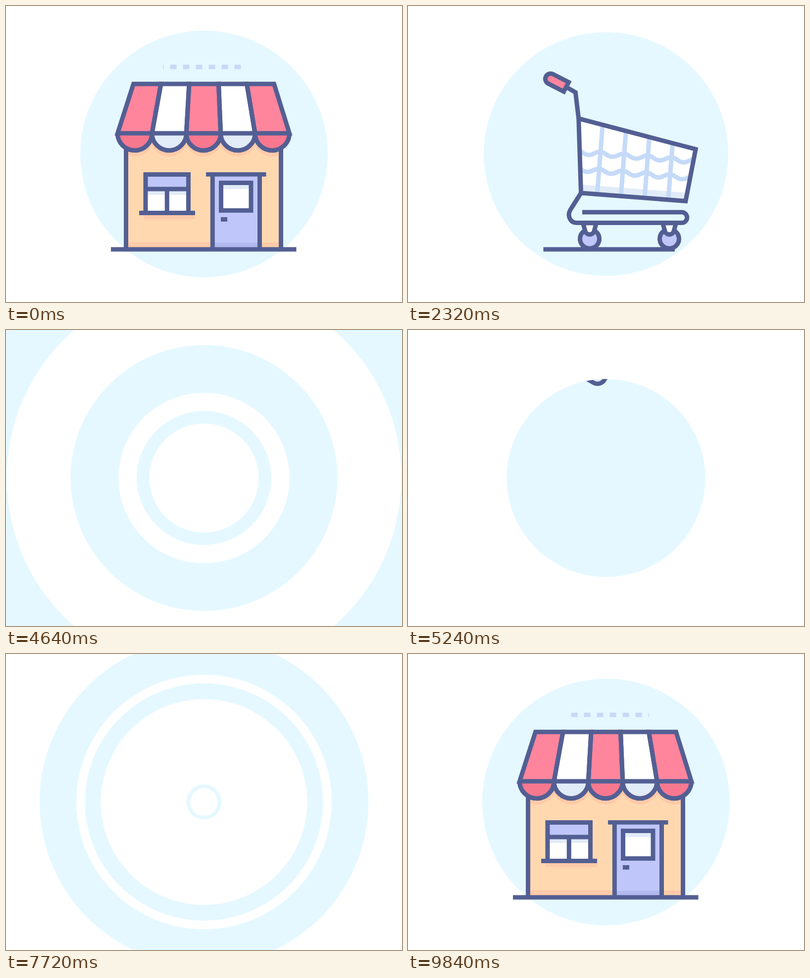
Animation, 800 px wide and 600 px high, one loop 9.88 s. Source, as an HTML page:

```html
<!DOCTYPE html>
<html lang="en">
<head>
<meta charset="utf-8">
<title>Shop, cart, card</title>
<style>
  html, body { margin: 0; width: 100%; height: 100%; overflow: hidden; background: #fff; }
  svg { display: block; width: 800px; height: 600px; }
  .line { stroke: #535f93; stroke-width: 9; fill: none; }
  .navy { fill: #535f93; }
  .sky { fill: #e5f8ff; }
  .white { fill: #fff; }
  .pink { fill: #ff859d; }
  .rose { fill: #f87890; }
  .peach { fill: #ffd8b0; }
  .tan { fill: #ffcaa8; }
  .lilac { fill: #bfc6f9; }
  .dusk { fill: #b1b9ee; }
  .pale { fill: #e2ecf8; }
  .mesh { stroke: #c5daf8; stroke-width: 9; fill: none; }
  .dash { stroke: #c8d9f8; stroke-width: 9; fill: none; }
</style>
</head>
<body>
<svg id="stage" viewBox="0 0 800 600"></svg>
<script>
const LOOP = 9880, SPAN = LOOP / 3, FIRST = 1000;

const rect = (x, y, x2, y2, cls) =>
  `<rect x="${x}" y="${y}" width="${x2 - x}" height="${y2 - y}" class="${cls}"/>`;
const path = (d, cls) => `<path d="${d}" class="${cls}"/>`;
const circle = (x, y, r, cls) => `<circle cx="${x}" cy="${y}" r="${r}" class="${cls}"/>`;
const range = n => [...Array(n).keys()];

function awning() {
  const top = [257.5, 313, 370, 429.5, 486.5, 541.5];
  const low = i => 225.5 + 69.4 * i;
  const arc = i => `M${low(i)} 258A34.7 34.7 0 0 0 ${low(i + 1)} 258`;
  const panel = i => `M${top[i]} 158H${top[i + 1]}L${low(i + 1)} 258H${low(i)}Z`;
  const five = range(5);
  return `<g clip-path="url(#wall)"><g transform="translate(0 8)">
      ${five.map(i => circle(low(i) + 34.7, 258, 39, 'tan')).join('')}</g></g>` +
    five.map(i => path(arc(i), 'line ' ) + path(arc(i) + 'Z', i % 2 ? 'pale' : 'rose')).join('') +
    five.map(i => path(arc(i), 'line')).join('') +
    five.map(i => path(panel(i), i % 2 ? 'white' : 'pink')).join('') +
    five.map(i => path(panel(i), 'line')).join('');
}

function shop() {
  return rect(247, 270, 551, 490, 'peach') +
    rect(247, 479, 551, 490, 'tan') +
    path('M242.5 270V490M555.5 270V490', 'line') +
    awning() +
    rect(278, 424, 382, 432, 'tan') +
    rect(282, 341, 369, 416, 'white') +
    rect(282, 341, 369, 371, 'lilac') +
    rect(282, 375, 369, 383, 'pale') +
    path('M282 341.5H368.5V419.5H282ZM282 371H368.5M325.3 371V419', 'line') +
    rect(269, 415, 382, 424, 'navy') +
    rect(417, 341, 513, 490, 'lilac') +
    rect(417, 480, 513, 490, 'dusk') +
    path('M417.3 341V490M512.5 341V490', 'line') +
    rect(404, 337, 525.5, 345.7, 'navy') +
    rect(434, 358, 495, 415, 'white') +
    rect(434, 362, 495, 371, 'pale') +
    path('M434.5 358.5H495V414.5H434.5Z', 'line') +
    rect(434, 428, 447, 437, 'navy') +
    `<path id="sign" class="dash" stroke-dasharray="13"/>`;
}

const wave = y => `M299 ${y}` + 'c12 0 12 8 24 8s12-8 24-8'.repeat(6);
const wheel = x => circle(x, 472, 19.5, 'line lilac-in') +
  path(`M${x - 13.5} 440L${x - 9.3} 455A9.4 9.4 0 0 0 ${x + 9.3} 455L${x + 13.5} 440Z`, 'line white-in');
const BASKET = 'M298 229L538.5 272.5L526.5 379H314.5Z';

function cart() {
  return `<g mask="url(#sweep)"><circle id="orbit" cx="401.5" cy="300" r="205" class="dash"
      pathLength="100" stroke-dasharray="1" clip-path="url(#aboveGround)"/></g>
    <g id="cart">
      ${wheel(332)}${wheel(493)}
      ${path('M314.5 379L293 413C286 425 293 439.5 305 439.5H519A10.8 10.8 0 0 0 519 418H317', 'line')}
      <g id="tray">
        <g class="item">${rect(321.5, 181.5, 455.5, 290, 'peach')}
          ${path('M322 217L455 241V262L322 238Z', 'tan-soft')}
          ${path('M321.5 239V181.5H455.5V262', 'line')}</g>
        <g class="item">${rect(417, 215, 516.5, 285, 'pink')}
          ${path('M417 234.5L516.5 252.5V275L417 255Z', 'rose')}
          ${path('M417 256V215H516.5V273', 'line')}</g>
        <g class="item">${path('M390.5 198L336 237L432 255Z', 'lilac')}
          ${path('M355 223L417 234.5L431 254L336 237Z', 'dusk')}
          ${path('M336 237L390.5 198L432 255', 'line')}</g>
        ${path(BASKET, 'white')}
        <g clip-path="url(#basket)">
          ${rect(300, 362, 540, 380, 'pale')}
          ${path(wave(293) + wave(327.5), 'mesh')}
          ${path(range(4).map(i => `M${347.3 + 48 * i} 220V380`).join(''), 'mesh')}
        </g>
        ${path(BASKET, 'line')}
        ${path('M268 167L287.5 176.5L298 229', 'line')}
        <g transform="translate(268 167) rotate(23)">
          ${path('M0-10.7H-35.5A10.7 10.7 0 0 0-35.5 10.7H0Z', 'line pink-in')}</g>
      </g>
    </g>`;
}

function card() {
  return `<g id="card">
    <rect x="-135" y="-85" width="270" height="170" rx="16" class="white"/>
    ${path('M-135 62H135V69A16 16 0 0 1 119 85H-119A16 16 0 0 1-135 69Z', 'pale')}
    ${rect(-135, -48, 135, -14, 'lilac')}
    ${path('M-135-48H135M-135-14H135M-105 22H-30M-105 45H-60', 'line')}
    ${rect(66, 18, 105, 48, 'pink')}
    <rect x="-135" y="-85" width="270" height="170" rx="16" class="line"/></g>`;
}

const stage = document.getElementById('stage');
stage.innerHTML = `<defs>
    <style>.lilac-in{fill:#bfc6f9}.white-in{fill:#fff}.pink-in{fill:#ff859d}.tan-soft{fill:#ffcfa6}</style>
    <clipPath id="wall"><rect x="247" y="260" width="304" height="60"/></clipPath>
    <clipPath id="basket"><path d="${BASKET}"/></clipPath>
    <clipPath id="aboveGround"><rect width="800" height="489"/></clipPath>
    <clipPath id="hole"><circle id="holeDisc" cx="400" cy="300"/></clipPath>
    <mask id="sweep" maskUnits="userSpaceOnUse" x="0" y="0" width="800" height="600">
      <circle id="sweepArc" cx="401.5" cy="300" r="205" fill="none" stroke="#fff" stroke-width="14"
        pathLength="100" transform="rotate(120 401.5 300)"/></mask>
  </defs>
  ${circle(400, 300, 250, 'sky disc')}
  <g clip-path="url(#hole)">
    <g class="scene">${cart()}</g><g class="scene">${card()}</g>
    <g class="scene"><g id="shop">${shop()}</g></g>
  </g>
  <path id="ground" class="line"/>
  <g id="rings">${range(7).map(i => circle(400, 300, 0, i % 2 ? 'sky' : 'white')).join('')}</g>`;

const $ = id => document.getElementById(id);
const set = (el, name, value) => el.setAttribute(name, value);
const rings = [...$('rings').children];
const scenes = [...stage.querySelectorAll('.scene')];
const items = [...stage.querySelectorAll('.item')];
const disc = stage.querySelector('.disc');

// Smooth monotone curve through flat [time, value, time, value, ...] points.
function curve(...p) {
  const n = p.length / 2, T = i => p[2 * i], V = i => p[2 * i + 1];
  const slope = i => (V(i + 1) - V(i)) / (T(i + 1) - T(i));
  const tangent = i => {
    if (i === 0) return slope(0);
    if (i === n - 1) return slope(n - 2);
    const a = slope(i - 1), b = slope(i);
    return a * b <= 0 ? 0 : 2 * a * b / (a + b);
  };
  return t => {
    if (t <= T(0)) return V(0);
    if (t >= T(n - 1)) return V(n - 1);
    let i = 0;
    while (t > T(i + 1)) i++;
    const h = T(i + 1) - T(i), s = (t - T(i)) / h, s2 = s * s, s3 = s2 * s;
    return (2 * s3 - 3 * s2 + 1) * V(i) + (s3 - 2 * s2 + s) * h * tangent(i) +
      (3 * s2 - 2 * s3) * V(i + 1) + (s3 - s2) * h * tangent(i + 1);
  };
}

const burst = curve(-60, 250, 0, 254, 133, 331, 240, 510);
const grow = curve(800, 0, 947, 200, 1060, 289, 1320, 247, 1480, 250);
const ringSize = [
  curve(20, 0, 133, 255, 250, 510),
  curve(45, 0, 133, 237, 240, 510),
  curve(60, 0, 133, 207, 280, 311, 420, 510),
  curve(110, 0, 133, 34, 280, 164, 470, 510),
  curve(113, 0, 133, 27, 280, 97, 540, 510),
  curve(210, 0, 280, 59, 620, 510),
  curve(225, 0, 280, 44, 700, 510)
];
const roll = curve(930, -430, 1200, 0, 1320, 35, 1560, -6, 1720, 0);
const lean = curve(930, -5, 1180, -2, 1320, 4.46, 1520, -2, 1680, 0.8, 1800, 0);
const fall = curve(0, -290, 220, 0, 290, -12, 360, 0);
const sweep = curve(1800, 0, 2500, 100);
const cardX = curve(860, 290, 947, 314, 1250, 400);
const cardY = curve(860, -140, 947, -27, 1230, 318, 1400, 292, 1540, 300);
const cardTurn = curve(860, 36, 947, 30, 1250, -6, 1420, 3, 1580, 0);
const rise = curve(930, 380, 1230, -14, 1400, 5, 1520, 0);
const signEnd = curve(1500, 317, 1900, 487);
const groundSize = curve(950, 0, 1300, 1, SPAN, 1, SPAN + 90, 0);

const pose = [
  (v, t) => {
    set($('cart'), 'transform', `translate(${roll(v)} 0)`);
    set($('tray'), 'transform', `rotate(${lean(v)} 314.5 379)`);
    items.forEach((el, i) => set(el, 'transform', `translate(0 ${fall(v - 1750 - 200 * i)})`));
    set($('orbit'), 'stroke-dashoffset', -0.69 - (t - 4000) * 0.05 / 12.88);
    set($('sweepArc'), 'stroke-dasharray', `${sweep(v)} 200`);
  },
  v => set($('card'), 'transform', `translate(${cardX(v)} ${cardY(v)}) rotate(${cardTurn(v)})`),
  (v, t) => {
    set($('shop'), 'transform', `translate(0 ${rise(v)})`);
    set($('sign'), 'd', `M317 123.5H${signEnd(v)}`);
    set($('sign'), 'stroke-dashoffset', 11.5 - t * 0.05);
  }
];
const floor = [[406.25, 132.75], null, [399.25, 187.25]];

function draw(t) {
  const since = (t - FIRST + LOOP) % LOOP;
  const next = Math.floor(since / SPAN), u = since - next * SPAN;
  const leaving = u < 700;
  const k = leaving ? (next + 2) % 3 : next;
  const v = leaving ? u + SPAN : u;
  const r = leaving ? burst(u) : u > SPAN - 60 ? burst(u - SPAN) : grow(u);

  set(disc, 'r', r);
  set($('holeDisc'), 'r', r);
  scenes.forEach((el, i) => set(el, 'display', i === k && !(leaving && u > 130) ? 'inline' : 'none'));
  pose[k](v, t);

  const line = floor[k], half = line ? line[1] * groundSize(v) : 0;
  set($('ground'), 'd', half ? `M${line[0] - half} 493.3H${line[0] + half}` : '');

  set($('rings'), 'display', u < 745 ? 'inline' : 'none');
  rings.forEach((el, i) => set(el, 'r', ringSize[i](u)));
}

function tick() {
  draw(performance.now() % LOOP);
  requestAnimationFrame(tick);
}
tick();
</script>
</body>
</html>
```
